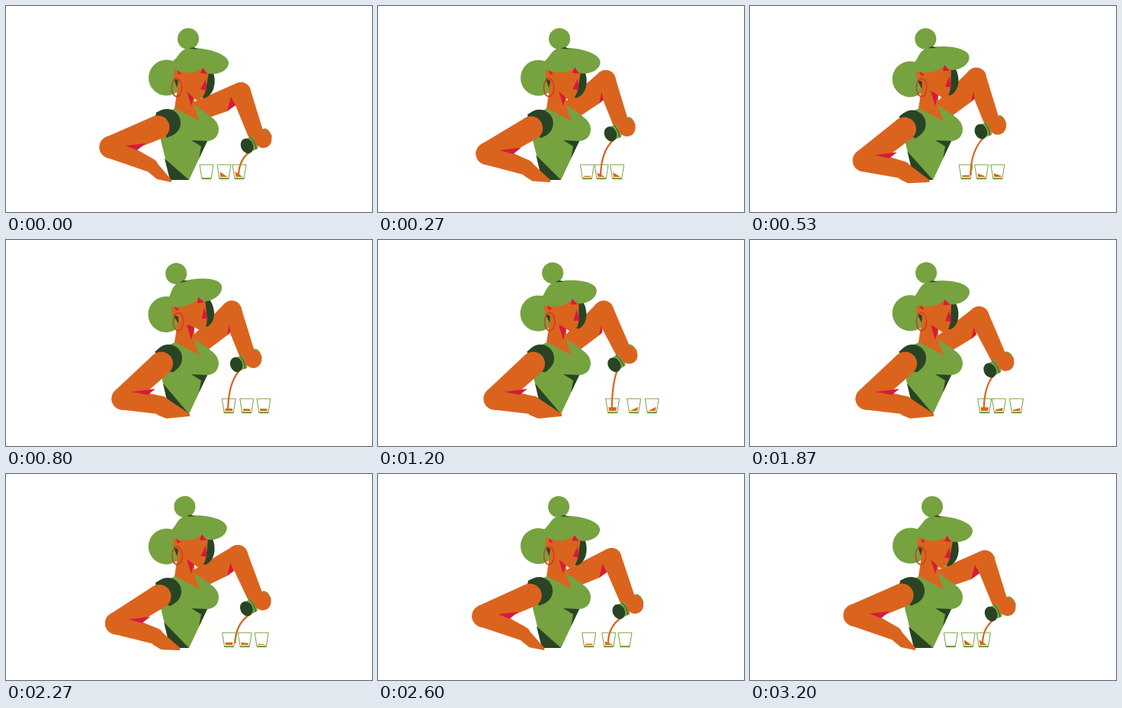
An HTML page with a canvas for the animation above (3270 ms loop, 480 by 270 pixels).

```html
<!DOCTYPE html>
<html lang="en">
<head>
<meta charset="utf-8">
<title>Pouring shots</title>
<style>
html, body { margin: 0; width: 100%; height: 100%; overflow: hidden; background: #fff; }
canvas { display: block; width: 480px; height: 270px; }
</style>
</head>
<body>
<canvas id="stage" width="480" height="270"></canvas>
<script>
const ctx = document.getElementById('stage').getContext('2d');
const LOOP = 3270;
const GREEN = '#76a240', DARK = '#294424', SKIN = '#da641e', PINK = '#d8193c';

// Each control is a few [time, value] keys; every part follows from these.
const CONTROLS = {
  lean:  [[0, 0], [270, .37], [800, 1], [1870, 1], [2600, .05]],
  nod:   [[0, 0], [270, -1], [800, -16], [1200, -10], [1870, -8], [2600, -2]],
  lift:  [[0, 0], [270, .78], [800, 1], [1200, 1], [1870, .63], [2600, .15]],
  reach: [[0, 0], [270, .8], [800, 1], [1200, .45], [1870, .1]],
  tilt:  [[0, -25], [800, -20], [1200, -36], [1870, -30], [2600, -25]],
  slide: [[0, 0], [270, .13], [800, .55], [1400, 1], [1870, .75], [2600, .31]],
  lead:  [[0, 0], [270, .24], [800, .62], [1200, .95], [1870, .95], [2600, .29]],
  aim:   [[0, 2], [270, 1], [800, 0], [1870, 0], [2600, 1]],
  last:  [[0, 3], [1870, 2.5], [2600, 0]]
};

// Smooth cyclic interpolation that never overshoots its keys.
function sample(keys, t) {
  const n = keys.length;
  const time = i => keys[(i + n) % n][0] + LOOP * Math.floor(i / n);
  const value = i => keys[(i + n) % n][1];
  const rate = i => (value(i + 1) - value(i)) / (time(i + 1) - time(i));
  const slope = i => {
    const a = rate(i - 1), b = rate(i);
    return a * b <= 0 ? 0 : 2 * a * b / (a + b);
  };
  let i = 0;
  while (i < n - 1 && t >= time(i + 1)) i++;
  const d = time(i + 1) - time(i), u = (t - time(i)) / d, w = 1 - u;
  return w * w * (1 + 2 * u) * value(i) + u * w * w * d * slope(i) +
         u * u * (3 - 2 * u) * value(i + 1) - u * u * w * d * slope(i + 1);
}

const mix = (a, b, k) => a + (b - a) * k;

function fill(path, color) {
  ctx.fillStyle = color;
  ctx.fill(new Path2D(path));
}

function line(path, color, width) {
  ctx.strokeStyle = color;
  ctx.lineWidth = width;
  ctx.stroke(new Path2D(path));
}

function poly(points, color) {
  fill('M' + points.map(p => p.join()).join('L') + 'Z', color);
}

function oval(x, y, rx, ry, color) {
  ctx.fillStyle = color;
  ctx.beginPath();
  ctx.ellipse(x, y, rx, ry, 0, 0, Math.PI * 2);
  ctx.fill();
}

// Tapered limb between two round joints.
function limb([x1, y1], r1, [x2, y2], r2, color) {
  const len = Math.hypot(x2 - x1, y2 - y1);
  const nx = (y1 - y2) / len, ny = (x2 - x1) / len;
  oval(x1, y1, r1, r1, color);
  oval(x2, y2, r2, r2, color);
  poly([[x1 + nx * r1, y1 + ny * r1], [x2 + nx * r2, y2 + ny * r2],
        [x2 - nx * r2, y2 - ny * r2], [x1 - nx * r1, y1 - ny * r1]], color);
}

function turned(x, y, degrees, paint) {
  ctx.save();
  ctx.translate(x, y);
  ctx.rotate(degrees * Math.PI / 180);
  paint();
  ctx.restore();
}

function pouringArm({ lift, reach }) {
  const bend = 1 - lift;
  const shoulder = [251, 138];
  const elbow = [308 - 12 * lift, 113 - 20.5 * lift];
  const wrist = [327 - 12 * reach, 166 - 20 * lift];
  const low = [290, 125 + 13 * bend], side = [294 + 7 * bend, 121 + 9 * bend];
  limb(shoulder, 13, elbow, 13, SKIN);
  limb(elbow, 13, wrist, 10.5, SKIN);
  poly([shoulder, [258, 149], low, side, elbow], SKIN);
  poly([[293 + 2 * bend, 111 + 8 * bend], low, side], PINK);
}

function body(lean) {
  poly([[227, 95], [247, 108], [247, 132], [256, 154], [215, 145], [221, 134]], SKIN);
  poly([[236, 108], [247, 115], [243, 131]], PINK);
  fill('M204 142L222 134L254 151L246 129C262 141 279 148 279 161C279 172 271 177 264 177L240 228H216L203 176Z', GREEN);
  poly([[243, 176], [264, 177], [253, 200], [256, 184]], DARK);
  poly([[mix(208, 206, lean), mix(200, 188, lean)], [240, 228], [215, 228]], DARK);
}

function restingArm(lean) {
  const at = (x0, y0, x1, y1) => [mix(x0, x1, lean), mix(y0, y1, lean)];
  const [sx, sy] = at(211, 153, 213, 155);
  const elbow = at(137, 185, 153, 208), wrist = at(190, 209, 203, 216.5);
  const turn = Math.atan2(elbow[1] - sy, elbow[0] - sx);
  oval(sx, sy, 18, 18, DARK);
  line(`M${sx} ${sy}l${8 * Math.cos(turn)} ${8 * Math.sin(turn)}`, DARK, 36);
  limb(at(199, 159, 203.5, 162), 15.5, elbow, 14.5, SKIN);
  limb(elbow, 14.5, wrist, mix(9, 12, lean), SKIN);
  poly([at(187, 218, 198, 229), at(198, 227, 210, 234), at(217, 231, 241, 231),
        at(217, 228, 241, 228), at(194, 201, 206, 204.5)], SKIN);
  poly([at(157, 183, 165, 199), at(183, 180, 196, 195), at(172, 189, 186, 203)], PINK);
}

function backHair(nod) {
  turned(235, 100, nod / 2, () => oval(-24.5, -6, 23.5, 23.5, GREEN));
}

function head(nod) {
  turned(235, 100, nod, () => {
    ctx.translate(-235, -100);
    fill('M258 86L272 88C276 100 273 117 260 121L250 118Z', DARK);
    fill('M221 82H267L263 104C262 115 256 126 249 123L238 113L226 108C221 104 219 92 221 82Z', SKIN);
    poly([[220, 94], [226, 98], [224, 107]], DARK);
    poly([[224, 83], [230, 89], [226, 90]], PINK);
    poly([[262, 96], [255, 109], [263, 111]], PINK);
    poly([[255, 88], [259, 79], [264, 89]], PINK);
    oval(239, 43, 14, 14, GREEN);
    fill('M214 75C227 70 226 55 243 55C266 55 291 63 292 74C292 84 280 90 268 89C262 88 260 84 259 81C252 87 236 91 219 82Z', GREEN);
    poly([[240, 55.5], [246, 54], [252, 57]], DARK);
  });
  const ring = new Path2D();
  ring.ellipse(224 - nod / 8, 107, 6.7, 11.7, 0, 0, Math.PI * 2);
  ctx.strokeStyle = '#cf3f20';
  ctx.lineWidth = 1.6;
  ctx.stroke(ring);
}

// Liquid stands higher on one side while the glass slides.
function glass(x, level, skew) {
  const left = Math.max(0, level + skew), right = Math.max(0, level - skew);
  if (level > .2) {
    poly([[x + 4.5, 224], [x + 4.5 - left / 6, 224 - left],
          [x + 13.5 + right / 6, 224 - right], [x + 13.5, 224]], SKIN);
  }
  line(`M${x} 208h18l-3 18.5h-12Z`, GREEN, 1);
  fill(`M${x + 2.6} 225h12.8l-.4 2.2h-12Z`, GREEN);
}

function stream(x, y, endX) {
  line(`M${x} ${y}Q${endX + .5} ${mix(y, 222, .33)} ${endX} 222`, SKIN, 2.2);
}

function bottle(x, y, tilt) {
  turned(x, y, tilt, () => {
    fill('M3 -9H11Q14 0 11 9H3Z', GREEN);
    fill('M22 -11H30Q34 -8 34 -2V3H22Z', GREEN);
    oval(-1, 0, 8, 10, DARK);
    line('M8 -9Q11 0 8 9', DARK, .8);
    oval(22, 0, 11.5, 12.5, SKIN);
  });
}

function draw(t) {
  const s = {};
  for (const name in CONTROLS) s[name] = sample(CONTROLS[name], t);
  ctx.fillStyle = '#fff';
  ctx.fillRect(0, 0, 480, 270);
  backHair(s.nod);
  pouringArm(s);
  body(s.lean);
  head(s.nod);
  restingArm(s.lean);

  const glasses = [254 + 47 * s.lead, 277 + 54 * s.slide, 297 + 58 * s.slide];
  const first = Math.min(1, Math.floor(s.aim));
  const pourX = mix(glasses[first], glasses[first + 1], s.aim - first) + 8;
  const capX = 317 - 14 * s.reach, capY = 183 - 20 * s.lift;
  const slosh = 4 - 7 * s.slide;
  stream(capX + 3, capY + 8, pourX);
  glass(glasses[0], 5 * s.lead, 0);
  glass(glasses[1], 2.7, slosh);
  glass(glasses[2], s.last, slosh);
  bottle(capX, capY, s.tilt);
}

const start = performance.now();
function tick() {
  draw((performance.now() - start) % LOOP);
  requestAnimationFrame(tick);
}
tick();
</script>
</body>
</html>
```
